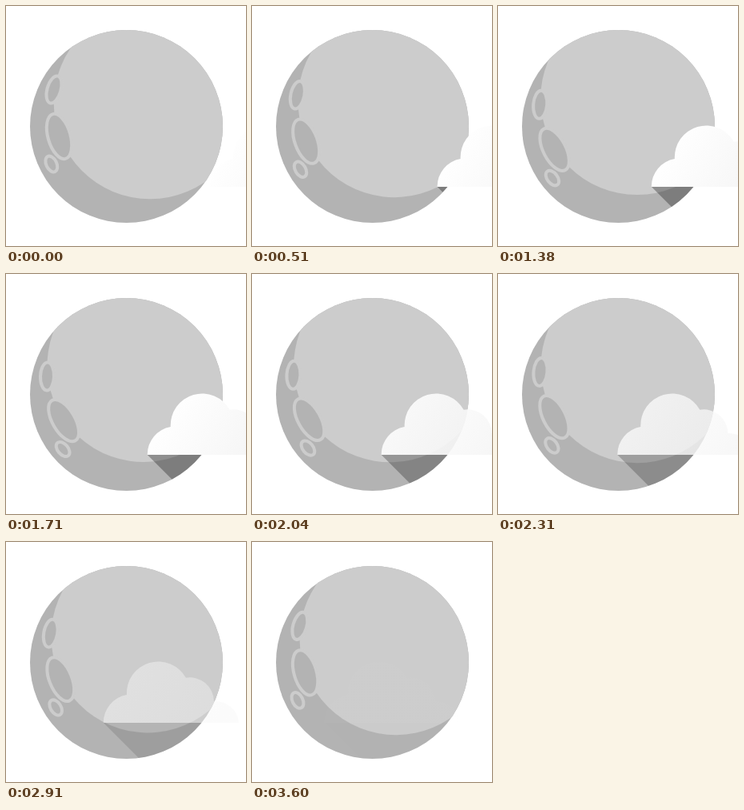
Write an HTML page that moves like this. It is 300x300 px and loops after 3630 ms.

```html
<!DOCTYPE html>
<html>
<head>
<meta charset="utf-8">
<style>
  html, body { margin: 0; width: 100%; height: 100%; overflow: hidden; background: #fff; }
  svg { display: block; width: 100vw; height: 100vh; }
</style>
</head>
<body>
<svg viewBox="0 0 300 300">
  <defs>
    <clipPath id="disc"><circle cx="150.5" cy="150.5" r="120.5"/></clipPath>
    <linearGradient id="mist" gradientUnits="userSpaceOnUse" x1="20" y1="170" x2="130" y2="240">
      <stop offset="0" stop-color="#fff"/>
      <stop offset="1" stop-color="#f5f5f5"/>
    </linearGradient>
  </defs>
  <g clip-path="url(#disc)">
    <rect width="300" height="300" fill="#b3b3b3"/>
    <g id="face">
      <circle cx="180.2" cy="120.8" r="120.5" fill="#ccc"/>
      <g fill="#b3b3b3" stroke="#ccc" stroke-width="4">
        <ellipse rx="8.5" ry="17.5" transform="translate(60 104.5) rotate(16)"/>
        <ellipse rx="14" ry="29" transform="translate(66.5 163) rotate(-16)"/>
        <ellipse rx="6.5" ry="10.5" transform="translate(56.8 197.5) rotate(-26)"/>
      </g>
    </g>
    <path id="shadow" d="M0 226h170v170z"/>
  </g>
  <path id="cloud" fill="url(#mist)"
    d="M0 226A35 35 0 0 1 29 191A39.5 39.5 0 0 1 103 169.8A30 30 0 0 1 138 199A30 28 0 0 1 169 226Z"/>
</svg>
<script>
  const LOOP = 3630;
  const [face, shadow, cloud] = ['face', 'shadow', 'cloud'].map(id => document.getElementById(id));

  function draw(now) {
    const p = now % LOOP / LOOP;
    const swing = 1 - Math.abs(1 - 2 * p);
    const fade = Math.min(1, 2 - 2 * p);
    const drift = `translate(${255 - 166 * p})`;
    face.setAttribute('transform', `rotate(${-15 * swing} 150.5 150.5)`);
    cloud.setAttribute('transform', drift);
    shadow.setAttribute('transform', drift);
    cloud.setAttribute('opacity', fade);
    shadow.setAttribute('opacity', 0.3 * fade);
    requestAnimationFrame(draw);
  }
  requestAnimationFrame(draw);
</script>
</body>
</html>
```
